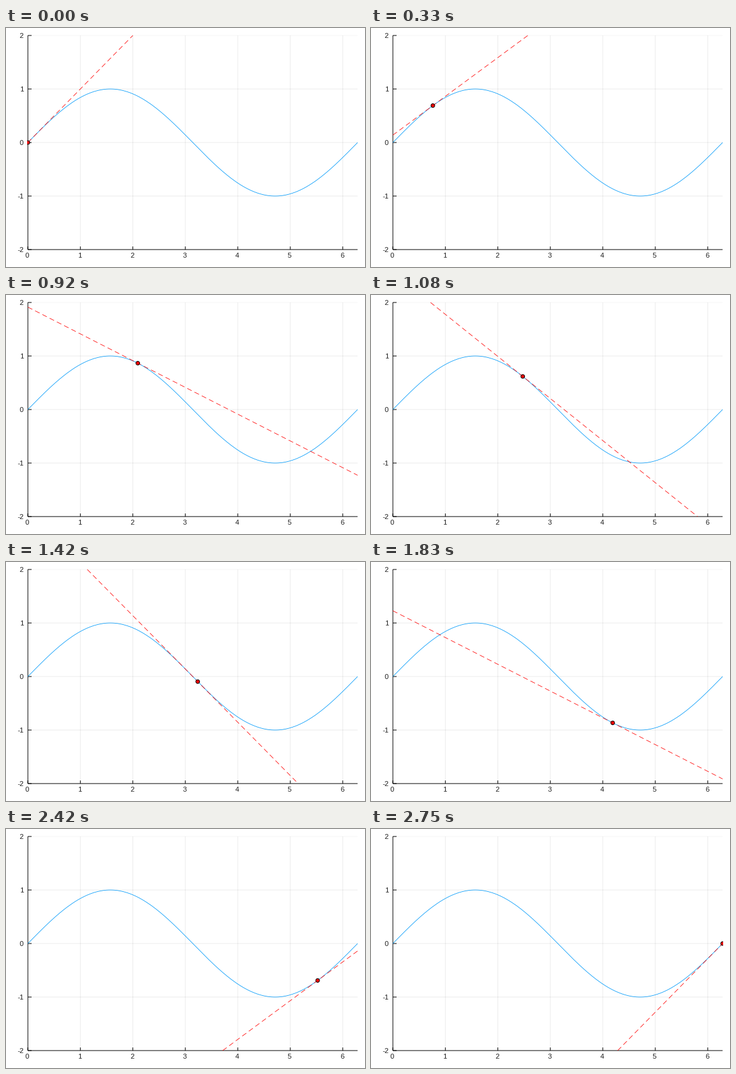
Write a matplotlib script that moves like this. It is 576 px wide and 384 px high and loops after 2.83 s.

```python
import numpy as np
import matplotlib.pyplot as plt
from matplotlib.animation import FuncAnimation
from matplotlib.patches import Circle, Rectangle

W, H, DPI = 576, 384, 96
PT = 72 / DPI                      # points per pixel
X0, Y0, SX, SY = 35.1, 184.0, 84.2, 86.0
X_MAX, Y_MAX = 2 * np.pi, 2
STEPS = 34                         # positions of the tangent point, 12 per second
TICKS = 283                        # 10 ms each
THIN = 0.8 * PT


def px(x):
    return X0 + SX * x


def py(y):
    return Y0 - SY * y


fig = plt.figure(figsize=(W / DPI, H / DPI), dpi=DPI, facecolor="white")
ax = fig.add_axes([0, 0, 1, 1])
ax.set_xlim(0, W)
ax.set_ylim(H, 0)
ax.axis("off")


def line(xs, ys, color, **kw):
    kw = {"lw": PT, "solid_capstyle": "butt", "snap": False, **kw}
    return ax.plot(xs, ys, color=color, **kw)[0]


def label(x, y, value, ha):
    ax.text(x, y, str(value), ha=ha, va="baseline", color="#1c1c1c",
            family="Liberation Sans", fontsize=11.2 * PT)


left, right = px(0), px(X_MAX)
top, bottom = py(Y_MAX), py(-Y_MAX)

# Grid
for n in range(1, 7):
    line([px(n)] * 2, [top, bottom], "black", alpha=0.08)
for n in range(-1, 3):
    line([left, right], [py(n)] * 2, "black", alpha=0.04 if n == 2 else 0.08)

# Axes, ticks and labels
line([left] * 2, [top, bottom], "black")
line([left, right], [bottom] * 2, "black")
for n in range(7):
    line([px(n)] * 2, [bottom, bottom - 5], "black")
    label(px(n) - 1.1, 369, n, "center")
for n in range(-2, 3):
    line([left, left + 6], [py(n)] * 2, "black")
    label(28.2, py(n) + 4, n, "right")

# Curve, tangent and point
t = np.linspace(0, X_MAX, 300)
line(px(t), py(np.sin(t)), "#009afa", lw=THIN)
tangent = line([], [], "red", lw=THIN, dash_capstyle="butt")
tangent.set_linestyle((0, (8.03 / 0.8, 5.02 / 0.8)))   # dashes scale with the width
point = ax.add_patch(Circle((left, Y0), 3, fc="red", ec="black", lw=PT, zorder=3))
view = Rectangle((34, 11), 531, 345, transform=ax.transData)
for part in (tangent, point):
    part.set_clip_path(view)


def tangent_ends(a):
    """Ends of the tangent at a, cut to the plot area."""
    slope, height = np.cos(a), np.sin(a)
    cuts = sorted(a + (y - height) / slope for y in (-Y_MAX, Y_MAX))
    xs = np.array([max(0, cuts[0]), min(X_MAX, cuts[1])])
    return xs, height + slope * (xs - a)


def update(i):
    step = (3 * i + 1) // 25
    a = X_MAX * step / (STEPS - 1)
    xs, ys = tangent_ends(a)
    tangent.set_data(px(xs), py(ys))
    point.center = px(a), py(np.sin(a))
    return tangent, point


anim = FuncAnimation(fig, update, frames=TICKS, interval=10,
                     repeat=True, repeat_delay=0, blit=False)
plt.show()
```
